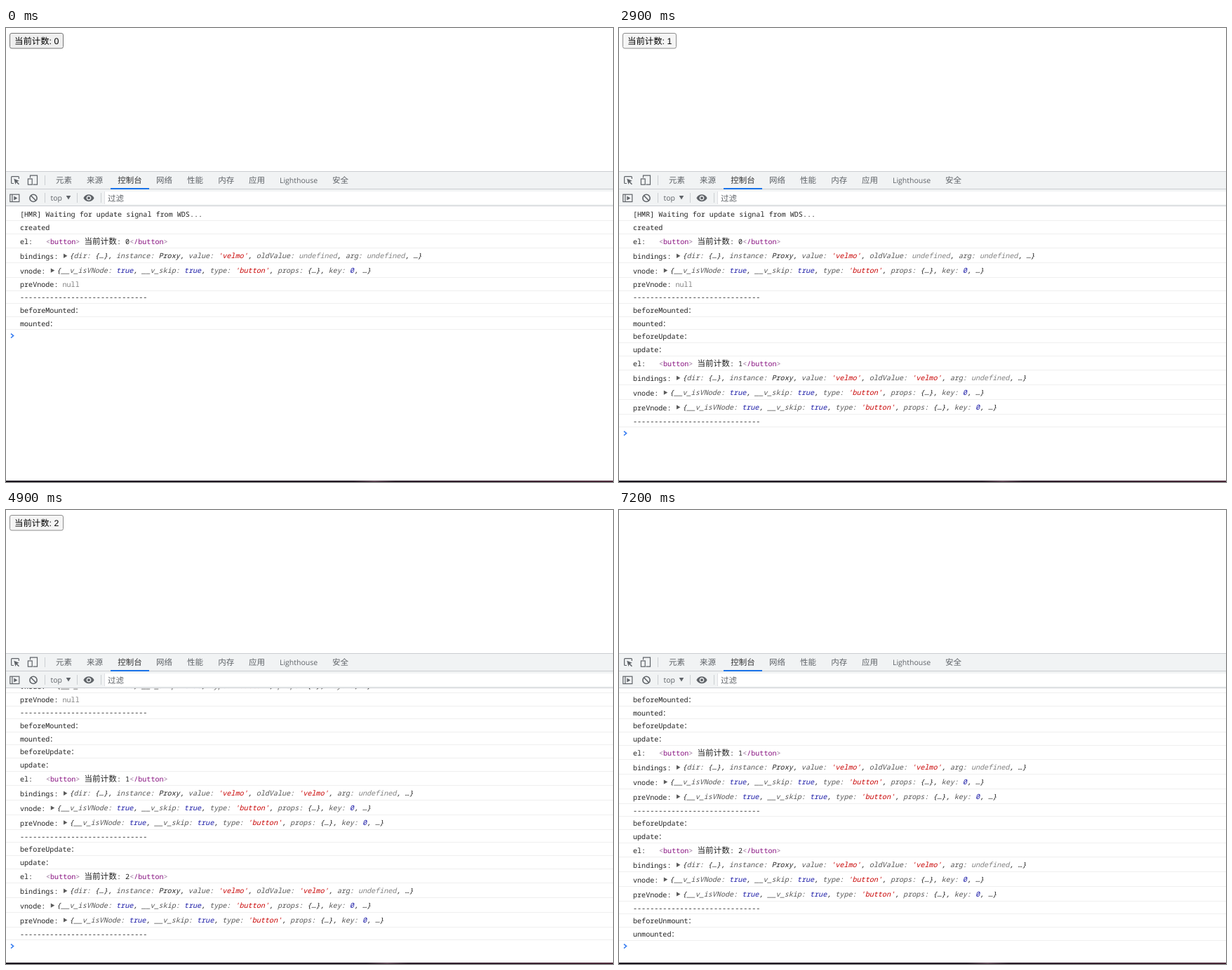
Animation of 865 by 647 pixels, one loop 7300 ms. Source, as an HTML page:

```html
<!DOCTYPE html>
<html lang="zh-CN">
<head>
<meta charset="utf-8">
<title>Console</title>
<style>
html, body { margin: 0; width: 100%; height: 100%; overflow: hidden; background: #fff; }
svg { display: block; width: 865px; height: 647px; }
text { white-space: pre; text-rendering: geometricPrecision; }
.ui { font: 11.5px "Open Sans", "Noto Sans CJK SC", "Noto Sans CJK", sans-serif; fill: #5f6368; }
.ui .latin { font-size: 10.5px; }
.ui .on { fill: #333; }
.icon { fill: none; stroke: #5f6368; stroke-width: 1.2; }
.icon .solid { fill: #5f6368; stroke: none; }
.btn { font: 12.4px "Liberation Sans", "Noto Sans CJK SC", "Noto Sans CJK", sans-serif; fill: #000; }
.log { font: 500 10.08px "Noto Sans Mono", "Noto Sans CJK SC", "Noto Sans CJK", monospace; fill: #222; }
.log .cjk { font-size: 11.6px; font-weight: 400; }
.log .preview { font-style: italic; }
.key { fill: #565656; }
.str { fill: #c80000; }
.num { fill: #1a1aa6; }
.nil { fill: #808080; }
.tag { fill: #881280; }
.angle { fill: #98749a; }
.rule { fill: #efefef; }

.btn, .face, .n0, .n1, .n2, .after1, .after2, .after3, .scroll, .prompt {
  animation: 7300ms step-end infinite;
}
.btn { animation-name: mounted; }
.face { animation-name: face; }
.n0 { animation-name: n0; }
.n1 { animation-name: n1; }
.n2 { animation-name: n2; }
.after1 { animation-name: after1; }
.after2 { animation-name: n2; }
.after3 { animation-name: after3; }
.scroll { animation-name: scroll; }
.prompt { animation-name: prompt; }
.glow { animation: drift 7300ms ease-in-out infinite; }

@keyframes mounted { 0% { opacity: 1 } 68.49%, 100% { opacity: 0 } }
@keyframes face {
  0% { fill: #efefef; stroke: #767676 }
  13.69% { fill: #e5e5e5; stroke: #4f4f4f }
  16.43% { fill: #f5f5f5; stroke: #8d8d8d }
  17.8% { fill: #e5e5e5; stroke: #4f4f4f }
  39.72% { fill: #f5f5f5; stroke: #8d8d8d }
  41.09% { fill: #e5e5e5; stroke: #4f4f4f }
  67.12%, 100% { fill: #f5f5f5; stroke: #8d8d8d }
}
@keyframes n0 { 0% { opacity: 1 } 17.8%, 100% { opacity: 0 } }
@keyframes n1 { 0% { opacity: 0 } 17.8% { opacity: 1 } 41.09%, 100% { opacity: 0 } }
@keyframes n2 { 0% { opacity: 0 } 41.09%, 100% { opacity: 1 } }
@keyframes after1 { 0% { opacity: 0 } 39.72%, 100% { opacity: 1 } }
@keyframes after3 { 0% { opacity: 0 } 68.49%, 100% { opacity: 1 } }
@keyframes scroll {
  0% { transform: translateY(0) }
  41.09% { transform: translateY(-95px) }
  68.49%, 100% { transform: translateY(-132px) }
}
@keyframes prompt {
  0% { transform: translateY(0) }
  39.72% { transform: translateY(139px) }
  41.09%, 100% { transform: translateY(183px) }
}
@keyframes drift { 50% { transform: translateX(24px) } }
</style>
</head>
<body>
<svg viewBox="0 0 865 647">
  <defs>
    <clipPath id="pane"><rect y="254" width="865" height="391"/></clipPath>
    <linearGradient id="edge">
      <stop offset="0" stop-color="#1c1720"/>
      <stop offset=".55" stop-color="#221924"/>
      <stop offset=".8" stop-color="#35202f"/>
      <stop offset="1" stop-color="#4a2838"/>
    </linearGradient>
    <linearGradient id="glow">
      <stop offset="0" stop-color="#8a6678" stop-opacity="0"/>
      <stop offset=".5" stop-color="#8a6678" stop-opacity=".5"/>
      <stop offset="1" stop-color="#8a6678" stop-opacity="0"/>
    </linearGradient>
  </defs>
  <rect width="865" height="647" fill="#fff"/>

  <g class="btn">
    <rect class="face" x="5.5" y="7.5" width="76" height="21.5" rx="2.5"/>
    <text class="n0" x="12" y="22.8">当前计数: 0</text>
    <text class="n1" x="12" y="22.8">当前计数: 1</text>
    <text class="n2" x="12" y="22.8">当前计数: 2</text>
  </g>

  <rect y="204" width="865" height="50" fill="#f1f3f4"/>
  <path d="M0 204.5H865M0 229.5H865M0 253.5H865" stroke="#cacdd1"/>
  <rect x="141" y="233" width="724" height="18" fill="#fff"/>
  <path d="M55.5 210v14M55.5 235v14M101.5 235v14M135.5 235v14" stroke="#cccfd2"/>
  <path d="M140.5 233v18" stroke="#dfe1e4"/>
  <rect x="149" y="228" width="55" height="2" fill="#1a73e8"/>

  <g clip-path="url(#pane)">
    <g class="log scroll" id="log"></g>
    <path class="prompt" d="M7 435.6l3.6 3-3.6 3" fill="none" stroke="#367cf1" stroke-width="1.5"/>
  </g>

  <g class="icon">
    <path d="M11 221.5H8.6a1 1 0 0 1-1-1v-7.8a1 1 0 0 1 1-1h8.8a1 1 0 0 1 1 1v2.3"/>
    <path class="solid" d="M11.3 214.8l7.4 2.9-2.9 1.3 3.2 3.2-1.1 1.1-3.2-3.2-1.3 2.9z"/>
    <path d="M34.5 213.5v-3.4h10v13h-6"/>
    <rect x="31.4" y="215" width="5.8" height="8.2"/>
    <rect x="5.8" y="237.2" width="13" height="10.4"/>
    <path d="M8.9 237v11"/>
    <path class="solid" d="M11.3 239.4l5 3-5 3z"/>
    <circle cx="39" cy="242.4" r="5.1" stroke-width="1.6"/>
    <path d="M35.4 238.8l7.2 7.2" stroke-width="1.6"/>
    <path class="solid" d="M85.7 239h6.6l-3.3 5.6z"/>
    <path class="solid" fill-rule="evenodd" d="M110.4 242.2c3-6.7 12.2-6.7 15.2 0c-3 6.7-12.2 6.7-15.2 0zM118 238.8a3.4 3.4 0 1 0 .01 0z"/>
    <circle class="solid" cx="118" cy="242.2" r="2"/>
  </g>

  <g class="ui">
    <text x="71" y="221.3">元素</text>
    <text x="115" y="221.3">来源</text>
    <text x="159.3" y="221.3" class="on">控制台</text>
    <text x="214" y="221.3">网络</text>
    <text x="258" y="221.3">性能</text>
    <text x="302.3" y="221.3">内存</text>
    <text x="346" y="221.3">应用</text>
    <text x="390" y="221" class="latin">Lighthouse</text>
    <text x="465" y="221.3">安全</text>
    <text x="63.5" y="246" class="latin">top</text>
    <text x="145" y="246.5">过滤</text>
  </g>

  <rect y="645" width="865" height="2" fill="url(#edge)"/>
  <rect class="glow" x="495" y="645" width="60" height="2" fill="url(#glow)"/>
</svg>
<script>
const CELL = 6.048, LEFT = 20, SHORT = 18.6, TALL = 20.8;
const log = document.getElementById('log');
let bottom = 255.4;

const span = (cls, s) => `<tspan class="${cls}">${s}</tspan>`;
const text = (x, y, s, cls = '') => `<text x="${x}" y="${y}" class="${cls}">${s}</text>`;

function colour(s) {
  return s.replace(/(\w+:)|('\w+')|(undefined)|\b(true|\d+)\b/g, (m, key, str, nil) =>
    span(key ? 'key' : str ? 'str' : nil ? 'nil' : 'num', m));
}

function row(height, draw) {
  bottom += height;
  return draw(bottom) + `<rect class="rule" y="${Math.round(bottom)}" width="865" height="1"/>`;
}

const line = s => row(SHORT, y => text(LEFT, y - 4.9, s));

const object = (label, body) => row(TALL, y => {
  const x = LEFT + (label.length + 1) * CELL;
  return text(LEFT, y - 4.8, label) +
    `<path d="M${x + 1.5} ${y - 12.6}l5.4 3.2-5.4 3.2z" fill="#5a5a5a"/>` +
    text(x + 10, y - 5.8, colour(body), 'preview');
});

const tag = name => span('angle', '&lt;') + span('tag', name) + span('angle', '&gt;');

const element = n => row(TALL, y => {
  const b = y - 5.4;
  return text(LEFT, b, 'el:') + text(57, b, tag('button')) +
    text(111.4, b, '当前计数', 'cjk') + text(158, b, ': ' + n + tag('/button'));
});

const bindings = old => object('bindings:',
  `{dir: {…}, instance: Proxy, value: 'velmo', oldValue: ${old}, arg: undefined, …}`);

const vnode = label => object(label,
  "{__v_isVNode: true, __v_skip: true, type: 'button', props: {…}, key: 0, …}");

const dashes = () => line('-'.repeat(30));

const update = n => [
  line('beforeUpdate：'), line('update：'), element(n), bindings("'velmo'"),
  vnode('vnode:'), vnode('preVnode:'), dashes()
];

const group = (cls, rows) => `<g class="${cls}">${rows.join('')}</g>`;

log.innerHTML =
  group('first', [
    line('[HMR] Waiting for update signal from WDS...'), line('created'),
    element(0), bindings('undefined'), vnode('vnode:'),
    line('preVnode: ' + span('nil', 'null')), dashes(),
    line('beforeMounted：'), line('mounted：')
  ]) +
  group('after1', update(1)) +
  group('after2', update(2)) +
  group('after3', [line('beforeUnmount：'), line('unmounted：')]);
</script>
</body>
</html>
```
